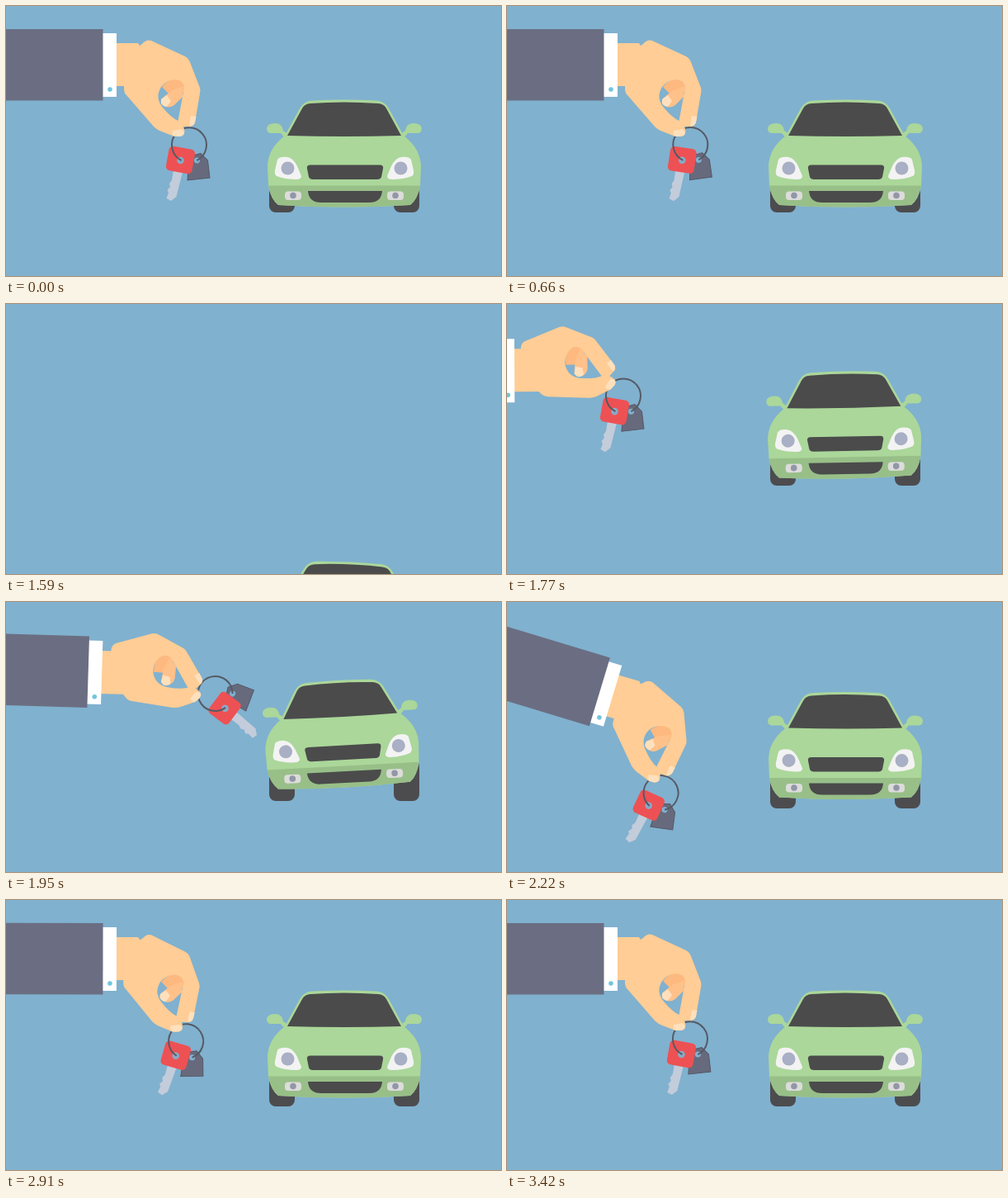
Write an HTML page that moves like this. It is 600 px wide and 327 px high and loops after 3450 ms.

```html
<!DOCTYPE html>
<html lang="en">
<head>
<meta charset="utf-8">
<title>Car keys</title>
<style>
  html, body { margin: 0; height: 100%; overflow: hidden; background: #80b1cf; }
  svg { display: block; width: 100%; height: 100%; }
</style>
</head>
<body>
<svg viewBox="0 0 600 327">
  <defs>
    <g id="side">
      <path fill="#abd79a" d="M316 144Q317 138 326 138Q335 138 336 147L343 152L339 157L333 150L320 150Q316 149 316 144Z"/>
    </g>
    <g id="lamps">
      <path fill="#f3f3f3" d="M329 182Q332 178 341 179Q348 180 353 190L358 202Q358 206 352 206Q338 206 328 202Q325 200 326 195Z"/>
      <circle cx="341.5" cy="192.5" r="8" fill="#a9afc4"/>
      <rect x="338" y="220.5" width="20" height="10.5" rx="4" fill="#dcdcda"/>
      <circle cx="348" cy="225.5" r="3.8" fill="#9296a8"/>
    </g>
  </defs>

  <g id="car">
    <g fill="#4c4c4f">
      <rect x="319" y="200" width="31" height="50" rx="8"/>
      <rect x="470" y="200" width="31" height="50" rx="8"/>
    </g>
    <g id="body">
      <use href="#side"/>
      <use href="#side" transform="matrix(-1 0 0 1 820 0)"/>
      <path fill="#abd79a" d="M338 153L356 120Q361 111 371 110.5Q410 108.5 449 110.5Q459 111 464 120L482 153Q503 169 503 191L502 214Q499 230 490 237Q410 242 330 237Q321 230 318 214L317 191Q317 169 338 153Z"/>
      <path fill="#98bf88" d="M318 213.500H502Q499 230 490 237Q410 242 330 237Q321 230 318 213.500Z"/>
      <g fill="#4b4b4b">
        <path d="M341 153L359 120Q362 114.500 369 114Q410 111 451 114Q458 114.500 461 120L479 153Q410 155 341 153Z"/>
        <path d="M369 188.500H453Q458 188.500 457 193L455 203Q454 206 450 206H372Q368 206 367 203L365 193Q364 188.500 369 188.500Z"/>
        <path d="M366 220H456Q455 234 440 234H382Q367 234 366 220Z"/>
      </g>
      <use href="#lamps"/>
      <use href="#lamps" transform="matrix(-1 0 0 1 820 0)"/>
    </g>
  </g>

  <g id="arm">
    <path fill="#ffcd95" d="M130 45H160L170 60V97H130Z"/>
    <rect x="116" y="33" width="18" height="77" fill="#fff"/>
    <circle cx="126" cy="101" r="2.800" fill="#72c5dc"/>
    <path fill="#6b6e82" d="M-420 28H117.500V114.500H-420Z"/>
    <g id="hand">
      <path fill="#fdb97f" d="M189 98Q196 89 206 88L220 95L212 108L198 107Z"/>
      <path fill="#ffc18a" d="M200 103L215 97L214 110L204 120Q197 125 190 120Q186 116 189 112Z"/>
      <path fill="#ffe0bd" d="M188 113L195 108L200 115L195 122Q191 122 188 118Z"/>
      <g id="keys">
        <path fill="#676a7d" stroke="#555866" d="M222 182L236 178.500L244.500 187L247 208L220 211Z"/>
        <path fill="#c3ccda" d="M203 199L214 201L206.500 231L200 236L194.500 233L197 226L195.500 223L199 219L198 215L201 211Z"/>
        <rect x="195.500" y="171.500" width="32" height="30" rx="5" fill="#ee5153" transform="rotate(10 211.500 186.500)"/>
        <circle cx="211.500" cy="187" r="4.300" fill="#8aa9c6"/>
        <circle cx="231.500" cy="187" r="3.500" fill="#80b1cf"/>
        <path fill="none" stroke="#555a65" stroke-width="2" d="M212.500 187A21 21 0 1 1 231.500 187"/>
      </g>
      <path fill="#ffcd95" fill-rule="evenodd" d="M165 46Q170 40 176 42L217 61Q221 63 223 68L235 99Q236 102 235 106L229 141Q227 147 221 146L215 146Q219 156 211 158L204 158L186 151Q182 149 179 146L146 108Q143 105 143 100L143 60Z
        M188 98Q194 90 205 89Q215 90 216 98L213 115L208.500 139Q200 135 190 123Q180 111 188 98Z"/>
      <path fill="#ffe0bd" d="M224 133L230.500 134L229 141Q227.500 146 222 145Z"/>
      <path fill="#ffe0bd" d="M202 151L213 149L216 153Q216 157 211 158L204 158Q200 155 202 151Z"/>
    </g>
  </g>
</svg>
<script>
const LOOP = 3450;
const el = id => document.getElementById(id);

// Smooth curve through time/value pairs, flat at every turning point.
function track(...list) {
  const keys = [];
  for (let i = 0; i < list.length; i += 2) keys.push({ t: list[i], v: list[i + 1] });
  const slope = i => {
    const a = keys[i - 1], b = keys[i], c = keys[i + 1];
    if (!a || !c || (b.v - a.v) * (c.v - b.v) <= 0) return 0;
    return (c.v - a.v) / (c.t - a.t);
  };
  return time => {
    let i = 0;
    while (i < keys.length - 1 && keys[i + 1].t <= time) i++;
    const a = keys[i], b = keys[i + 1];
    if (!b || time <= a.t) return a.v;
    const d = b.t - a.t, u = (time - a.t) / d, w = 1 - u;
    return w * w * (1 + 2 * u) * a.v + u * u * (3 - 2 * u) * b.v
      + d * u * w * (w * slope(i) - u * slope(i + 1));
  };
}

const carY = track(1140, 0, 1290, -22, 1500, 245, 1545, 245, 1590, 200, 1770, -30, 1950, -9, 2080, 0);
const bodyY = track(1545, 4, 1770, 2, 1950, -6, 2100, 4, 2250, -1, 2400, 0);
const bodyTilt = track(1500, 0, 1545, 3, 1590, 2.4, 1950, -3.1, 2130, 1.5, 2280, -.7, 2430, 0);

const armX = track(1500, 0, 1530, -350, 1600, -350, 1800, -90, 1950, -18, 2130, 0);
const armY = track(1140, 0, 1290, -22, 1500, 345, 1530, 345, 1560, 10, 1950, 10, 2280, 3, 2520, 11, 2730, -4, 2940, 0);
const armTilt = track(1600, 0, 1950, 1.7, 2280, 18, 2520, 4, 2760, -.8, 2970, .3, 3150, 0);
const handTilt = track(1530, 0, 1600, -46, 1950, -40, 2310, 24, 2520, 10, 2730, -5, 2940, 2, 3150, 0);
const keyTilt = track(0, 0, 330, 1, 660, -1.5, 1000, 0, 1530, 0, 1650, 35, 1950, -63, 2330, 34, 2520, 18,
  2730, -12, 2940, 7, 3120, -3, 3300, 1.5, 3450, 0);
const pinch = track(1700, 0, 1950, 1, 2150, 0);

const move = (id, x, y, angle, px, py) =>
  el(id).setAttribute("transform", `translate(${x} ${y}) rotate(${angle} ${px} ${py})`);

function draw() {
  const t = performance.now() % LOOP;
  const arm = armTilt(t), hand = handTilt(t), p = pinch(t);
  move("car", 0, carY(t), 0, 0, 0);
  move("body", 0, bodyY(t), bodyTilt(t), 410, 240);
  move("arm", armX(t), armY(t), arm, 0, 71);
  move("hand", 0, 0, hand - arm, 154.5, 73);
  move("keys", 3.2 * p, 4 * p, keyTilt(t) - hand, 208.5, 155);
  requestAnimationFrame(draw);
}
draw();
</script>
</body>
</html>
```
